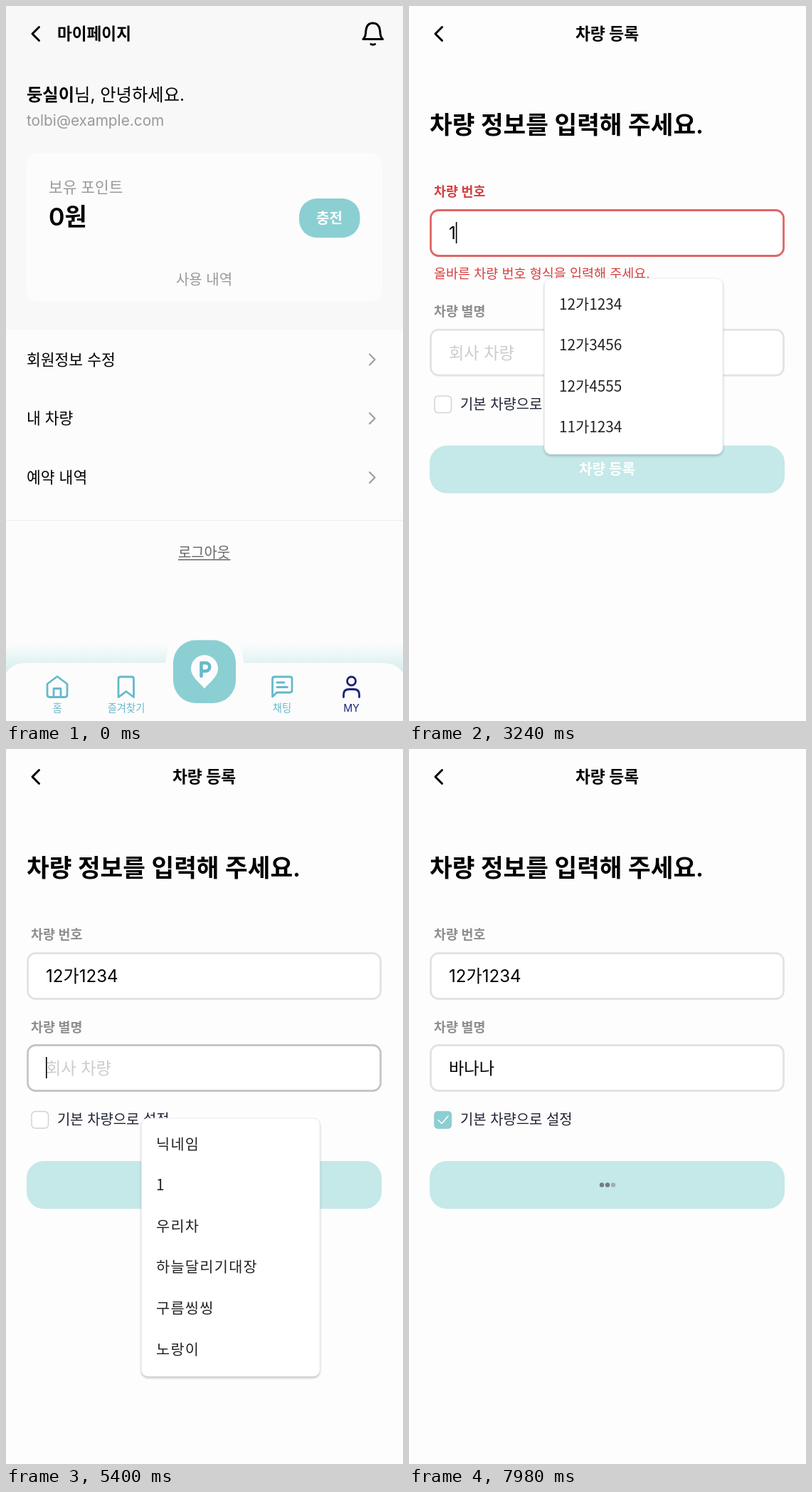
Write an HTML page that moves like this. It is 558 by 1003 pixels and loops after 8 s.

```html
<!DOCTYPE html>
<html lang="ko">
<head>
<meta charset="utf-8">
<title>차량 등록</title>
<style>
  html, body { margin: 0; width: 100%; height: 100%; overflow: hidden; background: #fdfdfd; }
  svg { display: block; width: 558px; height: 1003px; }
  text { font-family: Inter, 'Noto Sans CJK KR', 'Noto Sans CJK', sans-serif; white-space: pre; }
  .popup { filter: drop-shadow(0 2px 1.5px rgba(90, 110, 120, .4)); }
  .popup text { font-family: 'Noto Sans CJK KR', 'Noto Sans CJK', sans-serif; }
  .line { fill: none; stroke-linecap: round; stroke-linejoin: round; }
</style>
</head>
<body>
<svg id="stage" viewBox="0 0 558 1003"></svg>
<script>
const LOOP = 8000, STEP = 60;
const TEAL = '#8bcfd3', PALE = '#c5e8e8', ICON = '#66b9cc', GRAY = '#999', RED = '#d3403f';
const stage = document.getElementById('stage');
const $ = id => document.getElementById(id);

// Text is placed by the vertical centre of its glyphs.
const label = (x, cy, size, str, fill = '#000', extra = '') =>
  `<text x="${x}" y="${cy + size * .37}" font-size="${size}" fill="${fill}" ${extra}>${str}</text>`;
const mid = 'text-anchor="middle" ';
const bold = 'font-weight="600" ';
const box = (x, y, w, h, r, fill, extra = '') =>
  `<rect x="${x}" y="${y}" width="${w}" height="${h}" rx="${r}" fill="${fill}" ${extra}/>`;
const line = (d, color, width = 3) =>
  `<path class="line" d="${d}" stroke="${color}" stroke-width="${width}"/>`;
const back = line('M46.500 29.500L37 39L46.500 48.500', '#000');

const menuRow = (name, y) =>
  label(29, y, 21.5, name) + line(`M511 ${y - 7.5}l7.500 7.500l-7.500 7.500`, GRAY, 2);

const tab = (x, name, d, color = ICON) =>
  line(d, color, 2.8) + label(x, 985, 14.3, name, color, mid);

const myPage = `<g id="my">
  ${box(0, 0, 558, 454, 0, '#f8f8f8')}${box(0, 454, 558, 549, 0, '#fcfcfc')}
  ${back}${label(72, 39, 22.6, '마이페이지', '#000', bold)}
  ${line('M502 46.500H529.500C525 42.500 526.500 39 525.500 33.500C524.500 27 520.500 24 515.700 24C511 24 507 27 506 33.500C505 39 506.500 42.500 502 46.500ZM513 53.500Q515.700 55 518.500 53.500', '#000')}
  ${label(29, 124, 24.3, '<tspan font-weight="700">둥실이</tspan>님, 안녕하세요.')}
  ${label(29, 160, 20.8, 'tolbi@example.com', GRAY)}
  ${box(28, 206, 501, 208, 16, '#fcfcfc')}
  ${label(60, 254, 21.4, '보유 포인트', GRAY)}
  ${label(60, 295, 34, '0원', '#000', bold)}
  ${box(412, 270, 85.5, 55, 25, TEAL)}${label(454.5, 297.5, 20, '충전', '#fff', mid + bold)}
  ${label(278.5, 384, 20, '사용 내역', GRAY, mid)}
  ${menuRow('회원정보 수정', 496)}${menuRow('내 차량', 578.5)}${menuRow('예약 내역', 661.5)}
  ${box(0, 721, 558, 1, 0, '#eee')}
  ${label(278.5, 767, 19.9, '로그아웃', '#666', mid)}${box(242, 776, 73.5, 1.5, 0, '#666')}
  <linearGradient id="glow" x2="0" y2="1">
    <stop stop-color="#fcfcfc"/><stop offset="1" stop-color="#d5eeee"/>
  </linearGradient>
  ${box(0, 894, 558, 40, 0, 'url(#glow)')}
  <path d="M0 936Q8 921.500 30 921.500H224Q226 897 240 880H318Q332 897 334 921.500H528Q550 921.500 558 936V1003H0Z" fill="#fcfcfc"/>
  ${box(235, 889.5, 88, 88.5, 32, TEAL)}
  <path d="M279 957.500C273 950 260 941 260 929.500A19 19 0 0 1 298 929.500C298 941 285 950 279 957.500Z" fill="#fcfcfc"/>
  ${line('M274.500 940V921.500H280.500A5.700 5.700 0 0 1 280.500 933H275', ICON, 4.6)}
  ${tab(72, '홈', 'M58 951L72 940.500L86 951V966Q86 969.500 82.500 969.500H61.500Q58 969.500 58 966ZM67 969V957.500H77V969')}
  ${tab(169, '즐겨찾기', 'M158 944Q158 941 161 941H176.500Q179.500 941 179.500 944V969.500L168.800 961.500L158 969.500Z')}
  ${tab(388, '채팅', 'M374.500 969V944Q374.500 941 377.500 941H399Q402 941 402 944V960Q402 963 399 963H380.500ZM381 949H391M381 955.500H395.500')}
  ${tab(485.5, 'MY', 'M474.500 969.500V966Q474.500 958.500 482 958.500H489Q496.500 958.500 496.500 966V969.500M479.500 947a6 6 0 1 0 12 0a6 6 0 1 0 -12 0', '#1a237e')}
</g>`;

const carPage = `<g id="cars">
  ${box(0, 0, 558, 1003, 0, '#fdfdfd')}
  ${back}${label(278.5, 39, 22.7, '내 차량', '#000', mid + bold)}
  ${box(29.5, 110, 498, 138, 14, '#fff', 'stroke="#e3e3e3" stroke-width="2"')}
  ${label(50, 158, 24, '우리차', '#000', bold)}${label(50, 212, 20, '11가1234', GRAY)}
  ${box(29, 285, 499, 66, 24, TEAL)}${label(278.5, 318, 20.1, '차량 등록', '#fff', mid + bold)}
  ${label(29, 385, 18.5, '차량은 최대 10대까지 등록할 수 있습니다.', GRAY)}
</g>`;

const field = (id, y, size, hint) => `
  ${box(30.5, y, 496, 64, 11, '#fff', `id="${id}Box" stroke-width="2.8"`)}
  ${label(56, y + 32, size, hint, '#ccc', `id="${id}Hint"`)}
  ${label(56, y + 32, size, '', '#000', `id="${id}Text"`)}
  ${box(0, y + 45, 0, 1.3, 0, '#333', `id="${id}Under"`)}
  ${box(0, y + 16.5, 1.6, 30, 0, '#000', `id="${id}Caret"`)}`;

const form = `<g id="form">
  ${box(0, 0, 558, 1003, 0, '#fdfdfd')}
  ${back}${label(278.5, 39, 22.7, '차량 등록', '#000', mid + bold)}
  ${label(29, 166, 34.4, '차량 정보를 입력해 주세요.', '#000', bold)}
  ${label(35, 260, 18.4, '차량 번호', '#8e8e8e', 'id="numLabel" ' + bold)}
  ${field('num', 286.5, 24.1, '12가3456')}
  ${label(35, 375, 18.5, '올바른 차량 번호 형식을 입력해 주세요.', RED, 'id="error"')}
  <g id="rest">
    ${label(35, 390, 18.4, '차량 별명', '#8e8e8e', bold)}
    ${field('nick', 415.5, 23.2, '회사 차량')}
    ${box(36, 508.5, 23.5, 23.5, 5, '#fff', 'stroke="#d0d0d0" stroke-width="1.4"')}
    <g id="check">${box(35.3, 508, 24.7, 24.7, 5, TEAL)}${line('M41 520.500L46 525.500L55 515', '#fff', 1.6)}</g>
    ${label(72, 520, 19.9, '기본 차량으로 설정', '#1f2333')}
    ${box(29, 578, 499, 67, 24, PALE)}
    ${box(29, 578, 499, 67, 24, TEAL, 'id="active"')}
    ${label(278.5, 611, 20.1, '차량 등록', '#fff', mid + bold + 'id="submit"')}
    <g id="dots" fill="#737d80">${[271, 279, 287].map(x => `<circle cx="${x}" cy="611.500" r="3.200"/>`).join('')}</g>
  </g>
  <g id="numPop" class="popup"></g>
  <g id="nickPop" class="popup"></g>
</g>`;

stage.innerHTML = myPage + carPage + form;

const plates = ['12가1234', '12가3456', '12가4555', '11가1234'];
const nicks = ['닉네임', '1', '우리차', '하늘달리기대장', '구름씽씽', '노랑이'];

// Each row: start, committed text, syllable being composed.
const numSteps = [
  [0, ''], [3240, '1'], [3300, '12'], [3540, '12', 'ㄱ'], [3900, '12', '가'],
  [4380, '12가1'], [4440, '12가12'], [4560, '12가123'], [4920, '12가1234']
];
const nickSteps = [
  [0, ''], [5760, '', 'ㅂ'], [5820, '', '바'], [5940, '', '반'],
  [6000, '바', '나'], [6060, '바', '난'], [6120, '바나', '나'], [7080, '바나나']
];
const numCount = [[0, 4], [3900, 3], [4380, 1]];
const numFade = [
  [2760, 0], [2820, .6], [2880, 1], [3480, 1], [3540, .85], [3600, .5], [3720, 0],
  [4080, 0], [4200, .5], [4320, 1], [4860, 1], [4920, .9], [5100, 0]
];
const nickFade = [[5340, 0], [5400, 1], [5760, 1], [5880, .36], [6000, 0]];

const pick = (rows, t) => rows.filter(r => r[0] <= t).pop();
const within = (t, a, b) => t >= a && t < b;
const show = (id, on) => $(id).setAttribute('visibility', on ? 'inherit' : 'hidden');
const fade = (id, v) => $(id).setAttribute('opacity', v);

function ramp(rows, t) {
  const i = rows.findIndex(r => r[0] > t);
  if (i < 0) return rows[rows.length - 1][1];
  if (!i) return rows[0][1];
  const [a, u] = rows[i - 1], [b, v] = rows[i];
  return u + (v - u) * (t - a) / (b - a);
}

function drawField(id, [, done, comp = ''], focus, caret, bad) {
  const text = $(id + 'Text');
  const measure = s => { text.textContent = s; return s ? text.getComputedTextLength() : 0; };
  const start = measure(done), end = measure(done + comp);
  $(id + 'Under').setAttribute('x', 56 + start);
  $(id + 'Under').setAttribute('width', end - start);
  $(id + 'Caret').setAttribute('x', 56 + end);
  show(id + 'Caret', caret);
  show(id + 'Hint', !(done + comp));
  $(id + 'Box').setAttribute('stroke', bad ? '#e06666' : focus ? '#c6c6c6' : '#e3e3e3');
}

function drawPopup(id, top, items, alpha, spacing) {
  const height = 74 + 57.6 * (items.length - 1), cy = top + height / 2;
  const scale = .94 + .06 * alpha;
  $(id).innerHTML = box(190.5, top, 250.5, height, 9, '#fff', 'stroke="#eceeef"') +
    items.map((s, i) => label(211, top + 36 + 57.6 * i, 20.8, s, '#222', `letter-spacing="${spacing}"`)).join('');
  $(id).setAttribute('transform', `translate(315.700 ${cy}) scale(${scale}) translate(-315.700 ${-cy})`);
  fade(id, alpha);
}

function draw(t) {
  show('my', t < 1140);
  show('cars', within(t, 1140, 2340));
  show('form', t >= 2340);

  const bad = within(t, 3240, 4920);
  const onNum = within(t, 2820, 5400), onNick = within(t, 5400, 7080);
  drawField('num', pick(numSteps, t), onNum, onNum, bad);
  drawField('nick', pick(nickSteps, t), onNick, onNick && t < 6600, false);
  $('numLabel').setAttribute('fill', bad ? RED : '#8e8e8e');
  show('error', bad);
  $('rest').setAttribute('transform', `translate(0 ${bad ? 38.6 : 0})`);

  drawPopup('numPop', 382, plates.slice(0, pick(numCount, t)[1]), ramp(numFade, t), 0);
  drawPopup('nickPop', 518, nicks, ramp(nickFade, t), 1.3);

  fade('check', ramp([[7020, 0], [7320, 1]], t));
  fade('active', ramp([[5700, 0], [5820, 1], [7740, 1], [7920, 0]], t));
  show('submit', t < 7800);
  show('dots', t >= 7800);
  [...$('dots').children].forEach((dot, i) =>
    dot.setAttribute('opacity', ramp([[7800, .3], [7900, 1]], t - i * 75)));
}

let last = -1;
function tick(now) {
  const t = Math.floor(now % LOOP / STEP) * STEP;
  if (t !== last) draw(last = t);
  requestAnimationFrame(tick);
}
draw(0);
requestAnimationFrame(tick);
</script>
</body>
</html>
```
